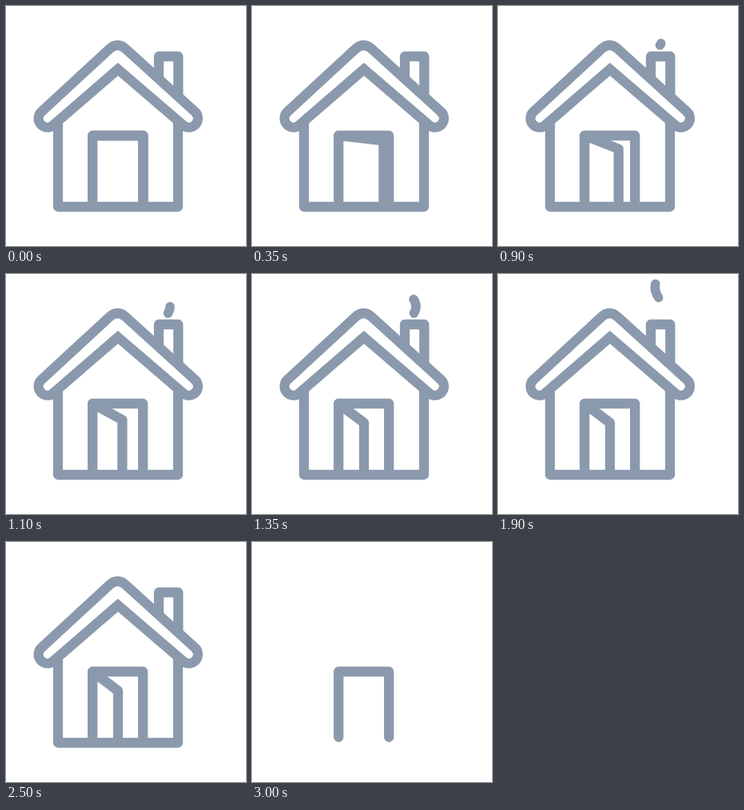
Animation, 300 px wide and 300 px high, one loop 3050 ms. Source, as an HTML page:

```html
<!DOCTYPE html>
<html lang="en">
<head>
<meta charset="utf-8">
<title>House</title>
<style>
  html, body { margin: 0; width: 100%; height: 100%; overflow: hidden; background: #fff; }
  svg { display: block; width: 100%; height: 100%; }
  path { fill: none; stroke: #8b99ad; stroke-width: 12.3; }
  .round { stroke-linejoin: round; stroke-linecap: round; }
</style>
</head>
<body>
<svg viewBox="0 0 300 300">
  <g id="house">
    <path d="M65 146V251H215V146" stroke-linejoin="round"/>
    <path d="M191 89V63H215.3V111" stroke-linejoin="round"/>
    <path d="M140 79L58.5 149.5A11.2 11.2 0 0 1 44 132.5L129.5 53.5Q139.5 44.5 149.5 53.5L236.5 132.5A11.2 11.2 0 0 1 222 149.5Z"/>
    <path id="door" class="round"/>
    <path id="smoke" class="round" pathLength="44" style="stroke-width:11.6"
      d="M202.5 49C207 42 205 36 201 30C196 23 195 16 198 8.7"/>
  </g>
  <path class="round" d="M108.2 244V162H171.2V244"/>
</svg>
<script>
  const LOOP = 3050, STEP = 50, SWING = 1300;
  const [house, door, smoke] = ['house', 'door', 'smoke'].map(id => document.getElementById(id));

  // Smoke head and tail: [time, distance along the path]
  const head = [[850, 0], [900, 2.5], [1100, 9], [1350, 19], [1650, 31], [1900, 40], [2100, 44]];
  const tail = [[1650, 0], [1900, 21.5], [2200, 41], [2450, 44]];

  function along(keys, t) {
    if (t <= keys[0][0]) return keys[0][1];
    for (let i = 1; i < keys.length; i++) {
      const [t0, a] = keys[i - 1], [t1, b] = keys[i];
      if (t <= t1) return a + (b - a) * (t - t0) / (t1 - t0);
    }
    return keys[keys.length - 1][1];
  }

  function draw(t) {
    house.style.display = t < 3000 ? '' : 'none';

    const p = Math.min(t / SWING, 1);
    const x = 171.7 - 31.7 * Math.pow(p, 1.12);
    const y = 162 + 24 * p;
    door.setAttribute('d', `M108.2 162L${x} ${y}V244`);

    smoke.style.display = t >= 850 && t < 2500 ? '' : 'none';
    const start = along(tail, t);
    const length = Math.max(along(head, t) - start, 0.05);
    smoke.setAttribute('stroke-dasharray', `${length} 100`);
    smoke.setAttribute('stroke-dashoffset', -Math.min(start, 43.9));
  }

  const origin = performance.now();
  function tick() {
    const t = (performance.now() - origin) % LOOP;
    draw(Math.floor(t / STEP) * STEP);
    requestAnimationFrame(tick);
  }
  draw(0);
  requestAnimationFrame(tick);
</script>
</body>
</html>
```
